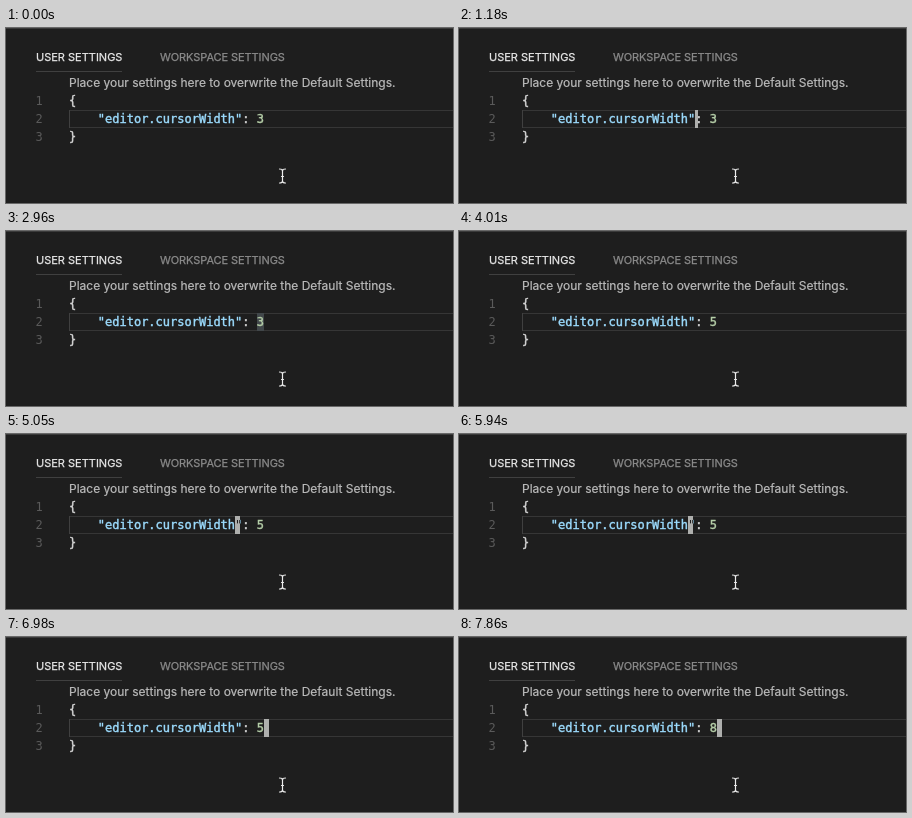
Write an HTML page that moves like this. It is 447 by 175 pixels and loops after 8 s.

```html
<!DOCTYPE html>
<html lang="en">
<head>
<meta charset="utf-8">
<title>Cursor width setting</title>
<style>
html, body { margin: 0; width: 100%; height: 100%; overflow: hidden; background: #1e1e1e; }
#stage { position: relative; width: 447px; height: 175px; overflow: hidden; background: #1e1e1e; }
#stage > * { position: absolute; white-space: pre; }
.edge { left: 0; top: 0; width: 447px; height: 1px; background: #3a3a3a; }
.tab { top: 20px; font: 11px/18px Inter, sans-serif; color: #8b8b8b; letter-spacing: -.08px; -webkit-text-stroke: .25px; }
.tab.on { color: #e7e7e7; letter-spacing: 0; }
.bar { left: 30px; top: 43px; width: 86px; height: 1px; background: #404040; }
.hint { left: 63px; top: 46px; font: 12px/18px Inter, sans-serif; color: #bcbcbc; -webkit-text-stroke: .2px; }
.code, .num, #caret { font: 12px/18px "DejaVu Sans Mono", monospace; }
.code { left: 62.9px; color: #d4d4d4; -webkit-text-stroke: .4px; }
.num { left: 29.5px; color: #5a5a5a; }
.line { left: 63px; top: 82px; width: 384px; height: 18px; box-sizing: border-box; border: solid #363636; border-width: 1px 0; }
.guide { left: 63px; top: 82px; width: 1px; height: 18px; background: #404040; }
.key { color: #9cdcfe; }
#digit { color: #b5cea8; }
#mark { top: 82px; height: 18px; background: #41474a; }
#caret { top: 82px; height: 18px; overflow: hidden; background: #aeafad; color: #1e1e1e; }
#caret span { position: absolute; top: 0; }
</style>
</head>
<body>
<div id="stage">
  <div class="edge"></div>
  <div class="tab on" style="left:30px">USER SETTINGS</div>
  <div class="tab" style="left:154px">WORKSPACE SETTINGS</div>
  <div class="bar"></div>
  <div class="hint">Place your settings here to overwrite the Default Settings.</div>
  <div class="line"></div>
  <div class="guide"></div>
  <div id="mark"></div>
  <div class="num" style="top:64px">1</div>
  <div class="num" style="top:82px">2</div>
  <div class="num" style="top:100px">3</div>
  <div class="code" style="top:64px">{</div>
  <div class="code" style="top:82px">    <span class="key">"editor.cursorWidth"</span>: <span id="digit">3</span></div>
  <div class="code" style="top:100px">}</div>
  <div id="caret"><span></span></div>
  <svg style="left:270px;top:138px" width="14" height="21" fill="none" stroke="#ececec" stroke-width="1.2" stroke-linecap="round">
    <path d="M3.5 3Q6.5 3 6.5 5Q6.5 3 9.5 3M6.5 4.5V15.5M3.5 17Q6.5 17 6.5 15Q6.5 17 9.5 17M5.5 10.5H7.5"/>
  </svg>
</div>
<script>
const LOOP = 8000;
const PITCH = 7.224, LEFT = 62.9;
const LINE = '    "editor.cursorWidth": ';
const KEY = [4, 24], VALUE = [26, 27];

// time, caret column (0 = blinked off), caret width, digit, highlighted columns
const steps = [
  [0, 0, 2, '3'],
  [300, 27, 2, '3'],
  [440, 27, 3, '3'],
  [590, 26, 3, '3'],
  [880, 26, 3, '3', VALUE],
  [1030, 25, 3, '3'],
  [1180, 24, 3, '3'],
  [1320, 23, 3, '3'],
  [1470, 22, 3, '3'],
  [1620, 21, 3, '3'],
  [1760, 22, 3, '3'],
  [1910, 23, 3, '3'],
  [2060, 24, 3, '3'],
  [2210, 25, 3, '3'],
  [2360, 26, 3, '3'],
  [2510, 27, 3, '3'],
  [2810, 27, 3, '3', VALUE],
  [2960, 0, 3, '3', VALUE],
  [3260, 26, 3, ''],
  [3410, 27, 3, '5'],
  [4010, 0, 3, '5'],
  [4460, 26, 5, '5'],
  [4760, 25, 5, '5'],
  [4900, 24, 5, '5'],
  [5050, 23, 5, '5'],
  [5200, 22, 5, '5'],
  [5490, 21, 5, '5'],
  [5940, 23, 5, '5'],
  [6390, 24, 5, '5', KEY],
  [6540, 25, 5, '5'],
  [6680, 26, 5, '5'],
  [6980, 27, 5, '5'],
  [7280, 27, 5, '5', VALUE],
  [7420, 0, 5, '5', VALUE],
  [7720, 26, 5, ''],
  [7860, 27, 5, '8']
];

const $ = id => document.getElementById(id);
const mark = $('mark'), caret = $('caret'), digit = $('digit');
const glyph = caret.firstElementChild;
const colX = col => LEFT + PITCH * col;
let shown = null;

function show([, col, width, value, range]) {
  digit.textContent = value;

  mark.hidden = !range;
  if (range) {
    const [a, b] = range.map(c => Math.round(colX(c)));
    mark.style.left = a + 'px';
    mark.style.width = b - a + 'px';
  }

  caret.hidden = !col;
  if (col) {
    const x = Math.round(colX(col));
    caret.style.left = x + 'px';
    caret.style.width = width + 'px';
    // wide carets repeat the covered character in the background colour
    glyph.textContent = width > 2 ? (LINE + value)[col] || '' : '';
    glyph.style.left = colX(col) - x + 'px';
  }
}

function tick() {
  const t = performance.now() % LOOP;
  const step = steps.findLast(s => s[0] <= t);
  if (step !== shown) show(shown = step);
  requestAnimationFrame(tick);
}
tick();
</script>
</body>
</html>
```
